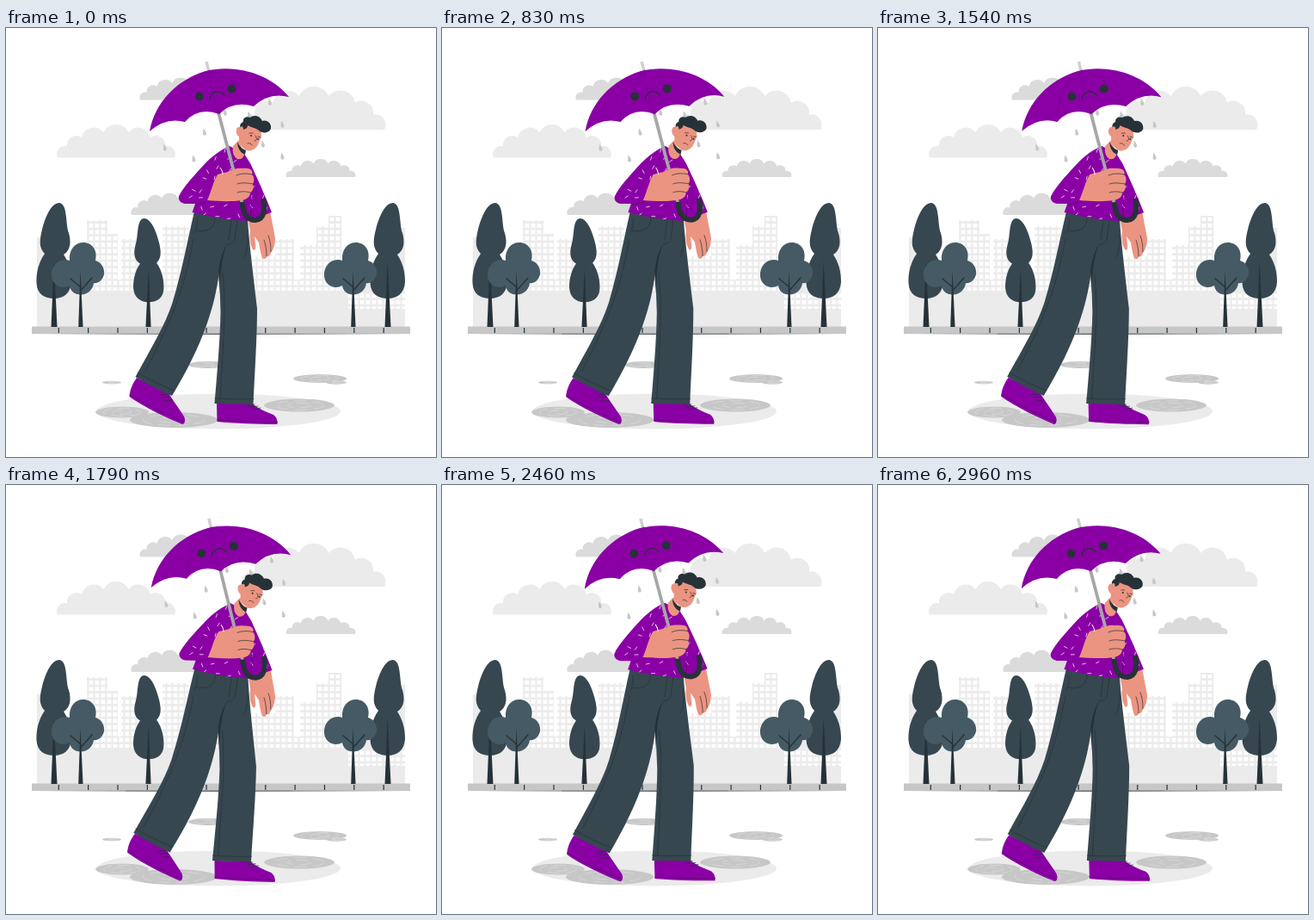
These frames come from a looping animation (500 by 498 pixels, 3 s). An HTML page:

```html
<!DOCTYPE html>
<html lang="en">
<head>
<meta charset="utf-8">
<title>Walk in the rain</title>
<style>
  html, body { margin: 0; width: 100%; height: 100%; overflow: hidden; background: #fff; }
  svg { display: block; width: 100%; height: 100%; }
  .pale { fill: #ebebeb; }
  .grey { fill: #dbdbdb; }
  .purple { fill: #8a00a5; }
  .skin { fill: #eb9481; }
  .cloth { fill: #37474f; }
  .leaf { fill: #455a64; }
  .dark { fill: #263238; }
  .line { fill: none; stroke: #263238; stroke-width: .7; stroke-linecap: round; stroke-linejoin: round; }
  .bold { stroke-width: 1.3; }
  .plum { stroke: #5e0071; }
  .seam { stroke: #5e0071; stroke-opacity: .35; }
  .ripple { fill: none; stroke: #e0e0e0; stroke-width: .6; vector-effect: non-scaling-stroke; stroke-dasharray: 14 7; }
</style>
</head>
<body>
<svg viewBox="0 0 500 498" preserveAspectRatio="none">
  <defs>
    <g id="tallTree">
      <path class="cloth" d="M62 203C53 203 46 218 42 234C39 246 38 255 45 262C38 272 35 284 35.500 296C36 309 45 314 56 314C67 314 75 308 76 295C76 282 73 272 67 263C75 258 76 249 73 238C69 228 72 204 62 203Z"/>
      <path class="dark" d="M55.700 270L59.500 347H52.500Z"/>
    </g>
    <g id="roundTree">
      <path class="leaf" d="M74 270C73 257 80 249 90 249C100 249 107 258 104 270C111 272 115 279 114 286C112 294 106 297 102 296C101 304 95 309.500 87 309.500C79 309.500 75 305 74 299C65 304 54 299 53 288C52 276 62 266 74 270Z"/>
      <path class="dark" d="M86.500 281L89.500 347H84.200Z"/>
      <path class="line bold" d="M87 301L75 291M87.500 304L100 290"/>
    </g>
    <g id="puddle">
      <circle r="10" fill="#c7c7c7"/>
      <circle class="ripple" r="7"/>
      <circle class="ripple" r="3.500"/>
    </g>
    <path id="drop" d="M-1.500-4.500C1.500-1 2.300 1 1.800 2.500C1 4.300-1.600 4-2 2C-2.200 0-1.600-2-1.500-4.500Z" fill="#c7c7c7"/>
    <path id="skyline" d="M36 347V243H68V292H94V223H118V239H130V292H134V245H156V292H182V230H212V265H313V245H335V292H342V252H361V230H375V218H390V292H440V232H464V347Z"/>
    <pattern id="panes" x="96.500" y="227" width="7" height="7.400" patternUnits="userSpaceOnUse">
      <rect width="4.800" height="4.800" fill="#fff"/>
    </pattern>
    <clipPath id="upperFloors"><path d="M94 220H394V305H94ZM398 306H464V326H398Z"/></clipPath>
    <path id="shirt" d="M260 137C250 141 239 149 229 160C217 173 207 184 201 195C200 200 203 203 208 204L220 204L216.500 214C236 219 257 223 281 224L309 214C302 196 293 176 284 157L277 146Z"/>
    <clipPath id="shirtClip"><use href="#shirt"/></clipPath>
  </defs>

  <g id="clouds"></g>
  <use class="pale" href="#skyline"/>
  <use href="#skyline" fill="url(#panes)" clip-path="url(#upperFloors)"/>

  <rect x="30" y="346.500" width="440" height="8.500" fill="#c7c7c7"/>
  <path class="dark" d="M30 355L250 354.700L470 355L250 355.800Z"/>
  <path id="joints" stroke="#263238" stroke-width="1.200"/>

  <use href="#tallTree"/>
  <use href="#tallTree" x="388"/>
  <use href="#tallTree" transform="translate(214.500 43.400) scale(-.875 .875)"/>
  <use href="#roundTree"/>
  <use href="#roundTree" x="317"/>

  <ellipse class="pale" cx="247" cy="445" rx="142" ry="20.500"/>
  <use href="#puddle" transform="translate(135 446) scale(3.100 .650)"/>
  <use href="#puddle" transform="translate(195 455) scale(5.100 .900)"/>
  <use href="#puddle" transform="translate(341 438) scale(4.100 .750)"/>
  <use href="#puddle" transform="translate(123 411.500) scale(1.100 .180)"/>
  <use href="#puddle" transform="translate(365 407) scale(3.100 .500)"/>
  <use href="#puddle" transform="translate(384 411.500) scale(1.200 .220)"/>
  <use href="#puddle" transform="translate(235 391) scale(2.300 .400)"/>

  <g id="walker">
    <!-- rain -->
    <use href="#drop" x="185" y="139"/>
    <use href="#drop" x="218.500" y="152"/>
    <use href="#drop" x="231" y="121"/>
    <use href="#drop" x="255" y="98"/>
    <use href="#drop" x="283" y="101"/>
    <use href="#drop" x="307" y="86"/>
    <use href="#drop" x="321.500" y="112"/>
    <use href="#drop" x="299" y="135"/>
    <use href="#drop" x="321.500" y="149"/>

    <!-- shoes -->
    <path class="purple" d="M152 406L189 424C194 432 202 443 207 451C209 455 208 460 205 460C188 453 160 440 143.500 428C144 420 147 413 152 406Z"/>
    <path class="line plum" d="M144 426C162 437 188 450 207 457"/>
    <path class="line" d="M178 426L188 425M181 429L191 428M184 433L193 432"/>
    <path class="purple" d="M245 436H286C294 442 303 446 311 449C315 452 316 456 315.500 460C292 460 266 459 245.500 457Z"/>
    <path class="line plum" d="M245.500 455C270 457 293 457 315.500 457.500"/>
    <path class="line" d="M279 437L289 437M283 440L293 439M287 443L296 441"/>

    <!-- hanging hand -->
    <path class="skin" d="M281 219L284 236C283 244 284 252 287 257C289 259 291 257 290 251L289 242L294 249C295 255 296 262 298 267C300 269 303 268 303 265C306 266 308 263 308 260C311 258 313 251 313 244L307 212Z"/>
    <path class="line" d="M303 265C303 258 302 252 300 246M308 260C308 252 307 246 305 241"/>

    <!-- trousers -->
    <path class="cloth" d="M219 213L281 222C283 253 288 290 292 326C292 360 289 404 287.500 437L242.500 436C246 395 249 360 249.500 330L248 283C243 322 230 366 193 427C178 420 163 413 150.500 405C168 373 185 345 193.500 319C205 281 211 246 219 213Z"/>
    <path class="dark" d="M257 251C253 257 249 267 247 283L248.500 309C249 288 250 268 257 251Z"/>
    <path class="line" d="M153 400C166 408 181 415 196 421M243 430C258 431 273 431 288 430.500M222 221C224 228 220 235 219 238M243 221C243 232 234 238 221 235M269 224L266 246C263 251 258 251 257 251M262 223L259 246M218 245C211 281 202 324 162 398M280 240C282 248 281 257 277 266M252 285C257 332 251 383 249 430"/>

    <!-- head -->
    <path class="skin" d="M275 109C272 113 273 115 272 115C267 114 267 121 269 124C270 126 271 126 271 126C270 133 274 140 281 142.500C287 143 292 139 294 133L297 126L296 113Z"/>
    <path class="dark" d="M272 115C275 113 276 115 276 118C280 117 281 115 281 113C286 116 291 116 294 119C298 123 306 122 308 117C309 111 304 106 298 108C295 101 287 101 284 104C279 102 275 105 276 109C273 110 272 112 272 115Z"/>
    <path class="line" d="M283 122L287 122M293 126L296 127M290 125C292 128 292 131 289 131M281 134C283 133 285 134 286 136"/>
    <circle class="dark" cx="285" cy="125" r="1"/>
    <circle class="dark" cx="293" cy="129" r="1"/>

    <!-- shirt and neck -->
    <use class="purple" href="#shirt"/>
    <path id="flecks" clip-path="url(#shirtClip)" fill="none" stroke="#ead0ef" stroke-width=".9" stroke-linecap="round"/>
    <path class="skin" d="M264 137C263 143 264 149 269 152C273 153 276 151 277 147L271 130Z"/>
    <path class="dark" d="M269 132C269 140 273 145 278 147L279 142C274 140 271 137 269 132Z"/>
    <path class="line plum" d="M222 205L236 202M286 196L284 221"/>

    <!-- umbrella -->
    <path d="M233 39L236 51" stroke="#d0d0d0" stroke-width="3.500"/>
    <path d="M247 98L275 205" stroke="#a6a6a6" stroke-width="3.800"/>
    <path class="purple" d="M167 120C173 86 199 60 232 50C266 42 306 52 329 80Q306 74 288 91Q264 84 248 100Q224 91 208 109Q186 103 167 120Z"/>
    <path class="line seam" d="M236 49Q207 74 208 109M236 49Q238 74 248 100M236 49Q268 57 288 91"/>
    <circle class="dark" cx="225" cy="79.500" r="5"/>
    <circle class="dark" cx="262.500" cy="70.500" r="5"/>
    <path class="line bold" d="M237 82C239 73 248 71 254 78"/>
    <path d="M274.500 202C276 216 280 223 290 223C300 222 302 211 299 198" fill="none" stroke="#263238" stroke-width="6"/>

    <!-- gripping hand -->
    <path class="skin" d="M234 200C239 189 241 178 246 170L258 167C264 164 269 162 276 163C283 162 288 165 286 170C289 173 289 178 287 181C289 186 286 190 284 191C284 196 280 199 274 200C261 202 246 201 234 200Z"/>
    <path class="line" d="M268 171C275 168 281 169 286 170M269 181C275 179 281 180 287 181M269 191C275 189 280 190 284 191"/>
    <path d="M249 162C251 165 252 167 252 170" fill="none" stroke="#fff"/>
  </g>
</svg>

<script>
const $ = id => document.getElementById(id);
const range = n => [...Array(n).keys()];

// Seven arcs over a sine hill, wider towards the middle, on a flat base.
function cloud(tone, left, right, base, height) {
  const puffs = 7;
  const points = range(puffs + 1).map(i => {
    const u = i / puffs;
    return [left + (right - left) * (u - 0.08 * Math.sin(2 * Math.PI * u)), base - height * Math.sin(Math.PI * u)];
  });
  const arcs = points.slice(1).map(([x, y], i) => {
    const r = 0.55 * Math.hypot(x - points[i][0], y - points[i][1]);
    return `A${r} ${r} 0 0 1 ${x} ${y}`;
  });
  return `<path class="${tone}" d="M${points[0]}${arcs.join('')}Z"/>`;
}

$('clouds').innerHTML =
  cloud('pale', 60, 196, 150.5, 30) + cloud('pale', 276, 440, 118, 40) +
  cloud('grey', 156, 250, 83.5, 20) + cloud('grey', 326, 406, 173, 16) + cloud('grey', 146, 235, 217, 20);

$('joints').setAttribute('d', range(12).map(i => `M${61.3 + i * 34.35} 348v6`).join(''));

// Short strokes scattered on a loose grid over the shirt.
let seed = 11;
const random = () => (seed = seed * 16807 % 2147483647) / 2147483647;
$('flecks').setAttribute('d', range(64).map(i => {
  const x = 198 + i % 8 * 14 + random() * 8, y = 138 + Math.floor(i / 8) * 11 + random() * 6;
  const angle = random() * Math.PI;
  return `M${x} ${y}l${4 * Math.cos(angle)} ${4 * Math.sin(angle)}`;
}).join(''));

// Linear sway of one degree either way, stepped at 24 pictures a second.
const SWAY = 1500, STEP = 1000 / 24;

function draw(time) {
  const phase = Math.floor((time + 5) / STEP) * STEP % SWAY / SWAY;
  const angle = phase < 0.25 ? phase * 4 : phase < 0.75 ? 2 - phase * 4 : phase * 4 - 4;
  $('walker').setAttribute('transform', `rotate(${angle} 236.5 249.5)`);
}

const start = performance.now();
function tick() {
  draw((performance.now() - start) % 3000);
  requestAnimationFrame(tick);
}
tick();
</script>
</body>
</html>
```
